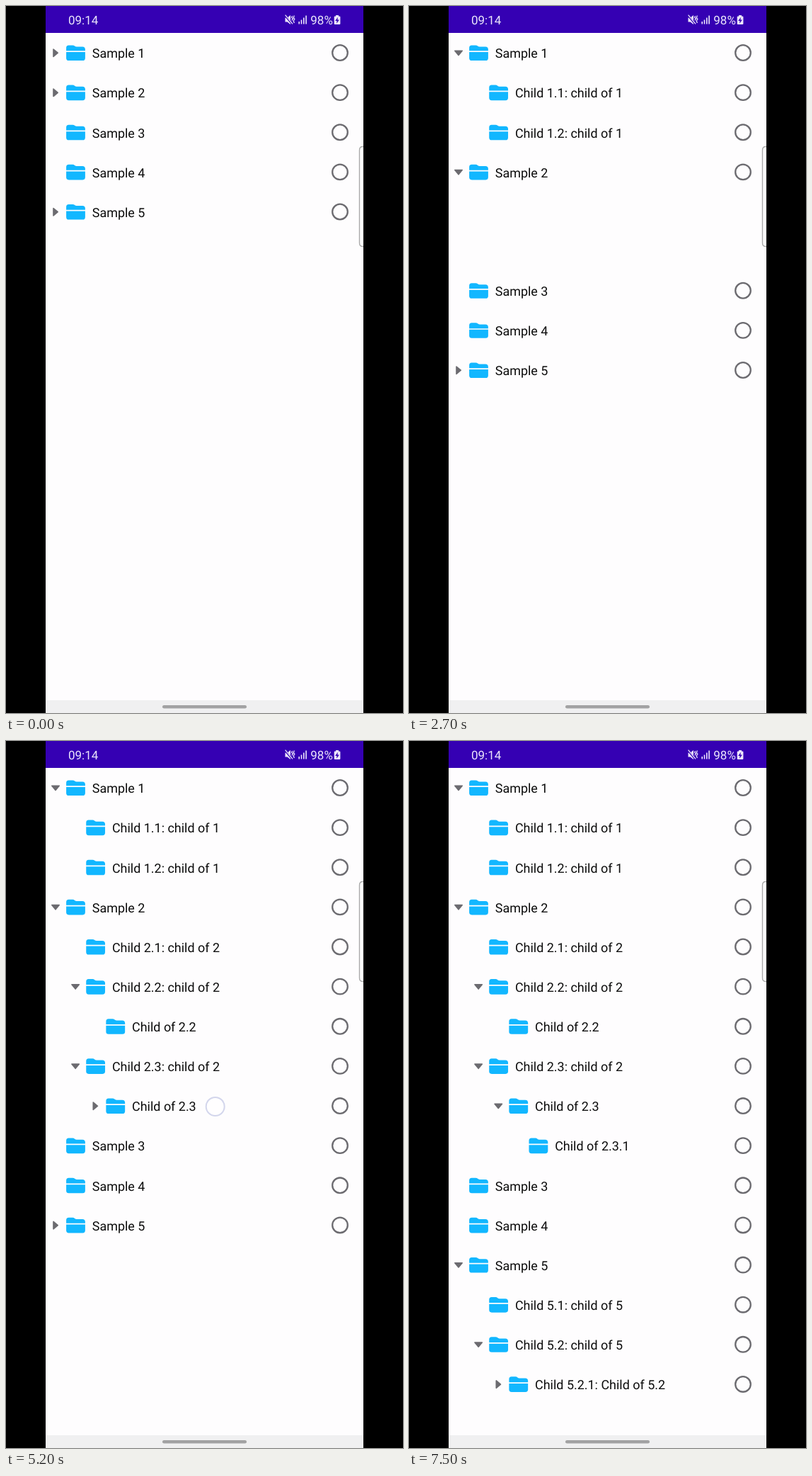
Animation, 561 px wide and 998 px high, one loop 8 s. Source, as an HTML page:

```html
<!DOCTYPE html>
<html lang="en">
<head>
<meta charset="utf-8">
<title>Tree list</title>
<style>
  html, body { margin: 0; width: 100%; height: 100%; overflow: hidden; background: #000; }
  svg { display: block; width: 100vw; height: 100vh; }
  text { font-family: Roboto, sans-serif; text-rendering: geometricPrecision; }
  .label { font-size: 17.95px; fill: #0c0c0c; }
  .status { font-size: 17px; fill: #ece6fb; }
</style>
</head>
<body>
<svg viewBox="0 0 561 998">
  <defs>
    <g id="folder" fill="#12b7ff">
      <path d="M-13.4-2.9V-7.3Q-13.4-10.8-9.9-10.8H-4.2Q-2.6-10.8-1.4-9.7Q-.3-8.6 1.3-8.6H9.6Q13.2-8.6 13.4-5V-2.9Z"/>
      <path d="M-13.4-1.2H13.4V7.2Q13.4 10.8 9.8 10.8H-9.8Q-13.4 10.8-13.4 7.2Z"/>
    </g>
    <path id="arrow" d="M-3-5.2V5.2L3.2 0Z" fill="#6c6b70" stroke="#6c6b70" stroke-width="1.6" stroke-linejoin="round"/>
  </defs>
  <rect width="561" height="998"/>
  <rect x="56" width="449" height="998" fill="#fefdfe"/>
  <g id="list"></g>

  <path d="M505.5 198.5H504Q499.5 198.5 499.5 203.5V334.5Q499.5 339.5 504 339.5H505.5" fill="#fefefe" stroke="#a9a9a9" stroke-width="1.4"/>
  <rect x="505" width="56" height="998"/>
  <rect x="56" y="980" width="449" height="18" fill="#f0f0f1"/>
  <rect x="221" y="987" width="119" height="4.4" rx="2.2" fill="#a2a2a3"/>

  <rect x="56" width="449" height="38" fill="#3500b3"/>
  <text class="status" x="88" y="26">09:14</text>
  <text class="status" x="430.3" y="26">98%</text>
  <g fill="#ece6fb">
    <path d="M394.5 16.5H397.5L402 13V26L397.5 22.5H394.5Z"/>
    <path d="M394 12.8L404.5 25.5" fill="none" stroke="#3500b3" stroke-width="2.6"/>
    <path d="M394.6 12.6L405 25.3M404.6 14L403.6 16.2L405.4 18L403.8 20.4M407.4 13.4L406.2 16.2L407.8 18.6L406.2 21L407.4 24" fill="none" stroke="#ece6fb" stroke-width="1.3"/>
    <path d="M413.4 22H415V25.6H413.4ZM416.7 19.4H418.3V25.6H416.7ZM420 16.6H421.6V25.6H420ZM423.3 13.6H424.9V25.6H423.3Z"/>
    <path d="M466 13H470V14.4H471.3Q472.4 14.4 472.4 15.5V25Q472.4 26.1 471.3 26.1H464.8Q463.7 26.1 463.7 25V15.5Q463.7 14.4 464.8 14.4H466Z"/>
    <path d="M468.9 15.8L465.2 20.9H467.6L467.1 24.8L470.9 19.6H468.4Z" fill="#3500b3"/>
  </g>
  <circle id="touch" r="13" fill="#fff" fill-opacity=".55" stroke="#d3d6ec" stroke-width="2"/>
</svg>
<script>
const LOOP = 8000, ROW = 56.13, INDENT = 28.13;
const RELEASE = 97, SETTLE = 150, FADE = 120;

// A tap opens a folder: rows below slide for `move` ms, then its children fade in.
const taps = [
  { at: 1350, x: 318, y: 69, move: 250 },
  { at: 2400, x: 328, y: 238, move: 250 },
  { at: 3600, x: 336.5, y: 350, move: 250 },
  { at: 4250, x: 324.5, y: 456.5, move: 250 },
  { at: 5200, x: 295.7, y: 516, move: 250 },
  { at: 6200, x: 300, y: 741, move: 0 },
  { at: 7050, x: 310, y: 853, move: 0 }
];

// depth, label, tap that reveals the row, tap that opens it (null: no arrow, -1: stays closed)
const rows = [
  [0, "Sample 1", null, 0],
  [1, "Child 1.1: child of 1", 0, null],
  [1, "Child 1.2: child of 1", 0, null],
  [0, "Sample 2", null, 1],
  [1, "Child 2.1: child of 2", 1, null],
  [1, "Child 2.2: child of 2", 1, 2],
  [2, "Child of 2.2", 2, null],
  [1, "Child 2.3: child of 2", 1, 3],
  [2, "Child of 2.3", 3, 4],
  [3, "Child of 2.3.1", 4, null],
  [0, "Sample 3", null, null],
  [0, "Sample 4", null, null],
  [0, "Sample 5", null, 5],
  [1, "Child 5.1: child of 5", 5, null],
  [1, "Child 5.2: child of 5", 5, 6],
  [2, "Child 5.2.1: Child of 5.2", 6, -1]
].map(([depth, label, shownBy, openedBy]) => ({ depth, label, shownBy, openedBy }));

const list = document.getElementById("list");
const touch = document.getElementById("touch");

function add(parent, tag, attrs) {
  const el = document.createElementNS("http://www.w3.org/2000/svg", tag);
  for (const key in attrs) el.setAttribute(key, attrs[key]);
  return parent.appendChild(el);
}

for (const row of rows) {
  const dx = row.depth * INDENT;
  row.el = add(list, "g", {});
  add(row.el, "use", { href: "#folder", x: 98.5 + dx, y: 0.2 });
  add(row.el, "text", { class: "label", x: 121.8 + dx, y: 7.3 }).textContent = row.label;
  add(row.el, "circle", { cx: 472, cy: 0, r: 10.8, fill: "none", stroke: "#6c6b70", "stroke-width": 2.3 });
  if (row.openedBy !== null) row.arrow = add(row.el, "use", { href: "#arrow" });
}

function ease(time, start, length) {
  if (time < start) return 0;
  if (time >= start + length) return 1;
  return 0.5 - Math.cos(Math.PI * (time - start) / length) / 2;
}

function draw(time) {
  let y = 66;
  for (const row of rows) {
    const tap = taps[row.shownBy];
    const start = tap ? tap.at + SETTLE : 0;
    const alpha = tap ? ease(time, start + tap.move, FADE) : 1;
    row.el.setAttribute("transform", `translate(0 ${y.toFixed(2)})`);
    row.el.setAttribute("opacity", alpha.toFixed(3));
    row.el.style.display = alpha > 0 ? "" : "none";
    if (row.arrow) {
      const opener = taps[row.openedBy];
      const open = opener && time >= opener.at + RELEASE;
      const x = 70 + row.depth * INDENT;
      row.arrow.setAttribute("transform", `translate(${x} 0.2) rotate(${open ? 90 : 0})`);
    }
    y += ROW * (tap ? ease(time, start, tap.move) : 1);
  }

  const tap = taps.find(t => time >= t.at - 5 && time < t.at + 145);
  touch.style.display = tap ? "" : "none";
  if (tap) {
    touch.setAttribute("cx", tap.x);
    touch.setAttribute("cy", tap.y);
  }
}

const begin = performance.now();
function tick() {
  draw((performance.now() - begin) % LOOP);
  requestAnimationFrame(tick);
}
tick();
</script>
</body>
</html>
```
